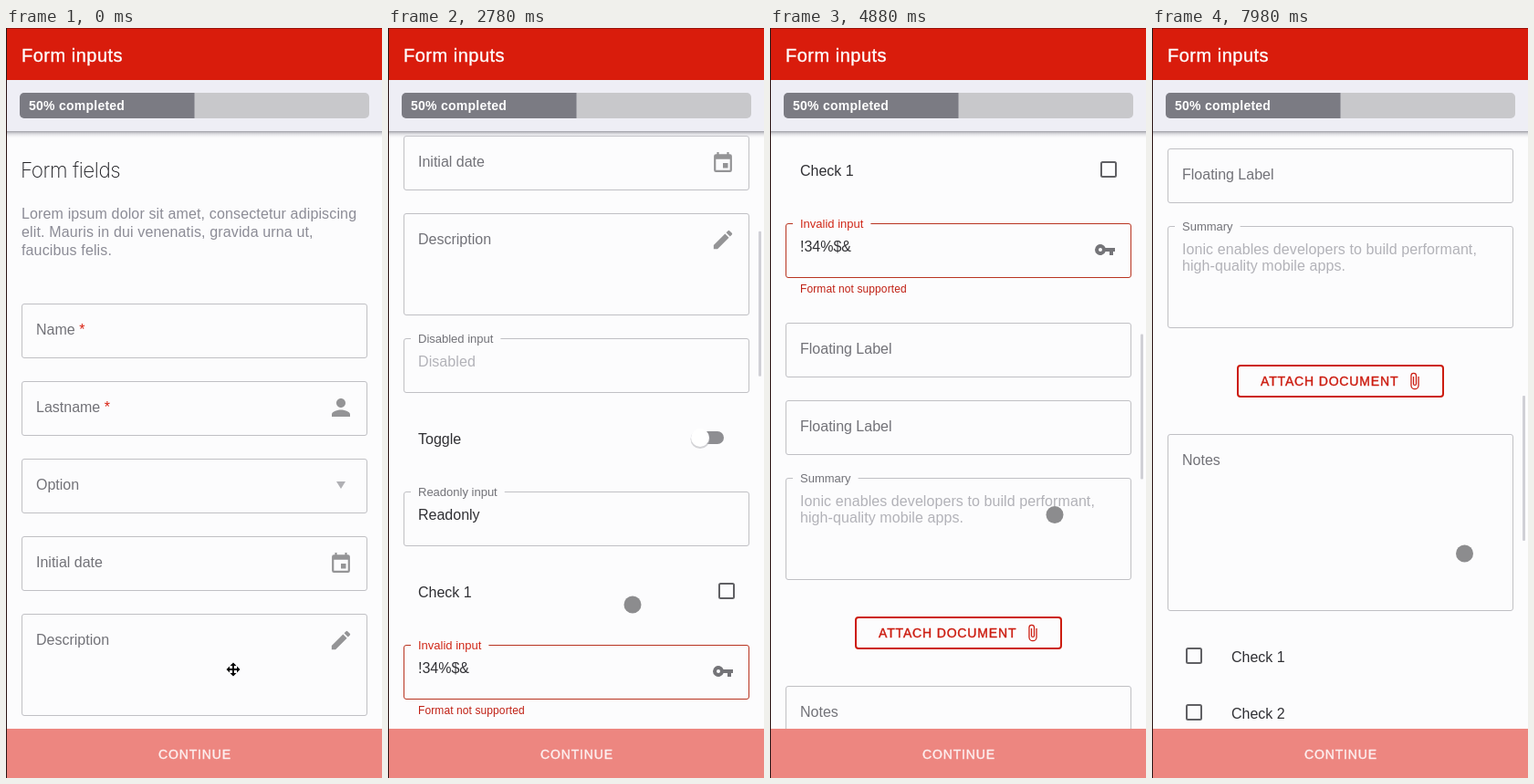
These frames come from a looping animation (412 by 822 pixels, 8000 ms). An HTML page:

```html
<!DOCTYPE html>
<html lang="en">
<head>
<meta charset="utf-8">
<title>Form inputs</title>
<style>
  html, body { margin: 0; width: 100%; height: 100%; overflow: hidden; background: #fcfcfd; }
  svg { display: block; width: 412px; height: 822px; font: 16px "Liberation Sans", Arial, sans-serif; }
  .heading { font: 200 22.5px Inter, sans-serif; letter-spacing: -.45px; fill: #1c1c20; }
  .intro { letter-spacing: .14px; fill: #8c8c96; }
  .label { fill: #727278; }
  .value { fill: #303034; }
  .faint { fill: #b2b2b8; letter-spacing: .08px; }
  .small { font-size: 13px; fill: #727278; }
  .small.bad { fill: #d02818; }
  .error { font-size: 12px; letter-spacing: .1px; fill: #c02014; }
  .title { font-size: 20px; letter-spacing: .5px; fill: #fff; stroke: #fff; stroke-width: .35px; }
  .percent { font-size: 14px; font-weight: bold; letter-spacing: .25px; fill: #fff; }
  .button { font-size: 14px; letter-spacing: .84px; stroke-width: .4px; }
  .red { fill: #cc1c10; stroke: #cc1c10; }
  .white { fill: #fdf0f0; stroke: #fdf0f0; }
</style>
</head>
<body>
<svg viewBox="0 0 412 822">
  <defs>
    <linearGradient id="shade" x2="0" y2="1">
      <stop stop-color="#808088" stop-opacity=".75"/>
      <stop offset=".4" stop-color="#c0c0c8" stop-opacity=".5"/>
      <stop offset="1" stop-color="#f0f0f4" stop-opacity="0"/>
    </linearGradient>
  </defs>
  <rect width="412" height="822" fill="#fcfcfd"/>
  <g id="page"></g>
  <rect id="thumb" x="406" width="3" height="159" rx="1" fill="#d0d0d6"/>

  <rect y="113" width="412" height="8" fill="url(#shade)"/>
  <rect y="57" width="412" height="56" fill="#eeeef5"/>
  <rect x="15" y="71" width="383" height="28" rx="5" fill="#c8c8cb"/>
  <path d="M206.500 71H20a5 5 0 0 0-5 5v18a5 5 0 0 0 5 5h186.500z" fill="#7b7b83"/>
  <text class="percent" x="25" y="90">50% completed</text>
  <rect width="412" height="57" fill="#d91c0c"/>
  <text class="title" x="17" y="37">Form inputs</text>

  <rect y="768" width="412" height="54" fill="#ed8680"/>
  <text class="button white" x="167" y="801">CONTINUE</text>
  <path d="M0 .5H412" stroke="#981008"/>
  <path d="M.5 0V822" stroke="#2a1414"/>

  <circle id="dot" r="9.500" fill="#8c8c8e"/>
  <path id="arrows" d="M0-7.500 3.500-4H1v3h3v-2.500L7.500 0 4 3.500V1H1v3h2.500L0 7.500-3.500 4H-1V1h-3v2.500L-7.500 0-4-3.500V-1h3v-3h-2.500z"
        fill="#000" stroke="#fff" stroke-width="1" paint-order="stroke"/>
</svg>
<script>
const DURATION = 8000;
const $ = id => document.getElementById(id);
const page = $('page');

function add(tag, attributes, content = '') {
  const node = document.createElementNS('http://www.w3.org/2000/svg', tag);
  for (const [key, value] of Object.entries(attributes)) node.setAttribute(key, value);
  node.textContent = content;
  return page.appendChild(node);
}

const text = (x, y, kind, content) => add('text', { x, y, class: kind }, content);

// Each icon: path on a 24-unit grid, grid centre, scale, colour.
const icons = {
  person: ['M12 12c2.21 0 4-1.79 4-4s-1.79-4-4-4-4 1.79-4 4 1.79 4 4 4zm0 2c-2.67 0-8 1.34-8 4v2h16v-2c0-2.66-5.33-4-8-4z', 12, 12, 1.25, '#949496'],
  event: ['M17 12h-5v5h5zM16 1v2H8V1H6v2H5a2 2 0 0 0-2 2v14a2 2 0 0 0 2 2h14a2 2 0 0 0 2-2V5a2 2 0 0 0-2-2h-1V1zm3 18H5V8h14z', 12, 11, 1.1, '#949496'],
  pencil: ['M3 17.25V21h3.75L17.81 9.94l-3.75-3.75zM20.71 7.04a1 1 0 0 0 0-1.41l-2.34-2.34a1 1 0 0 0-1.41 0l-1.83 1.83 3.75 3.75z', 12, 12, 1.13, '#949496'],
  key: ['M12.65 10A6 6 0 1 0 12.65 14H17v4h4v-4h2v-4zM7 14a2 2 0 1 1 0-4 2 2 0 0 1 0 4z', 12, 12, 1, '#747478'],
  arrow: ['M7 8H17L12 16z', 12, 12, 1, '#b0b0b4'],
  clip: ['M16.5 6v11.5a4 4 0 0 1-8 0V5a2.500 2.500 0 0 1 5 0v10.5a1 1 0 0 1-2 0V6H10v9.5a2.500 2.500 0 0 0 5 0V5a4 4 0 0 0-8 0v12.5a5.500 5.500 0 0 0 11 0V6z', 12.5, 12, .85, '#cc1c10'],
};

function icon(name, x, y) {
  const [d, cx, cy, scale, fill] = icons[name];
  add('path', { d, fill, 'fill-rule': 'evenodd', transform: `translate(${x} ${y}) scale(${scale}) translate(${-cx} ${-cy})` });
}

function outline(y, height, stroke = '#c0c0c4') {
  add('rect', { x: 17.5, y: y + .5, width: 378, height: height - 1, rx: 2.5, fill: 'none', stroke });
}

function field(y, label, iconName, height = 60) {
  outline(y, height);
  const node = text(33, y + 34, 'label', label);
  if (iconName) icon(iconName, 367, y + 29);
  return node;
}

// Field whose label sits in a gap of the top border.
function filledField(y, label, lines, kind, height = 60, bad = false) {
  outline(y, height, bad ? '#b83420' : undefined);
  const gap = add('rect', { x: 25, y: y - 1, height: 3, fill: '#fcfcfd' });
  const node = text(33, y + 4.5, bad ? 'small bad' : 'small', label);
  gap.setAttribute('width', node.getComputedTextLength() + 16);
  lines.forEach((line, i) => text(33, y + 31 + i * 18, kind, line));
}

function checkbox(x, y, textX, label) {
  add('rect', { x: x + 1, y: y - 8, width: 16, height: 16, rx: 1.5, fill: 'none', stroke: '#606064', 'stroke-width': 2 });
  text(textX, y + 7, 'value', label);
}

function required(label) {
  const star = add('tspan', { fill: '#d82010' }, ' *');
  label.appendChild(star);
}

text(16, 164, 'heading', 'Form fields');
['Lorem ipsum dolor sit amet, consectetur adipiscing', 'elit. Mauris in dui venenatis, gravida urna ut,', 'faucibus felis.']
  .forEach((line, i) => text(17, 209 + i * 20, 'intro', line));

required(field(302, 'Name'));
required(field(387, 'Lastname', 'person'));
field(472, 'Option', 'arrow');
field(557, 'Initial date', 'event');
field(642, 'Description', 'pencil', 112);
filledField(779, 'Disabled input', ['Disabled'], 'faint');

text(33, 895, 'value', 'Toggle');
add('rect', { x: 334, y: 881, width: 34, height: 14, rx: 7, fill: '#8e8e92' });
add('circle', { cx: 342, cy: 889.5, r: 10.5, fill: '#b8b8bc', opacity: .6 });
add('circle', { cx: 342, cy: 888, r: 10, fill: '#fff' });

filledField(947, 'Readonly input', ['Readonly'], 'value');
checkbox(362, 1056, 33, 'Check 1');
filledField(1115, 'Invalid input', ['!34%$&'], 'value', 60, true);
icon('key', 367, 1144);
text(33, 1191, 'error', 'Format not supported');
field(1224, 'Floating Label');
field(1309, 'Floating Label');
filledField(1394, 'Summary', ['Ionic enables developers to build performant,', 'high-quality mobile apps.'], 'faint', 112);

add('rect', { x: 94, y: 1547, width: 225, height: 34, rx: 3, fill: 'none', stroke: '#cc1c10', 'stroke-width': 2 });
text(119, 1569, 'button red', 'ATTACH DOCUMENT');
icon('clip', 288, 1564);

field(1622, 'Notes', null, 194);
checkbox(37, 1865, 87, 'Check 1');
checkbox(37, 1927, 87, 'Check 2');

// Drags and returns of the pointer: time, scroll, pointer x, pointer y.
const gestures = [
  [0, 0, 249, 703],
  [600, 0, 250, 703],
  [1500, 186, 257, 517],
  [1800, 186, 261.5, 581],
  [2050, 186, 263, 725],
  [2550, 439, 266, 472],
  [2780, 439, 268, 632],
  [3400, 532, 273, 539],
  [3520, 532, 274, 479.5],
  [3800, 532, 283, 720],
  [4250, 812, 295, 440],
  [4500, 812, 302, 622],
  [4880, 901, 312, 533.5],
  [5900, 901, 322, 608],
  [6980, 1019, 331.5, 490],
  [7350, 1019, 335, 734],
  [7980, 1177, 342.5, 576],
  [DURATION, 1177, 342.5, 576],
];

function pose(time) {
  const next = gestures.findIndex(gesture => gesture[0] > time);
  const from = gestures[next - 1], to = gestures[next];
  const u = (time - from[0]) / (to[0] - from[0]);
  const eased = u * u * (3 - 2 * u);
  return from.map((value, i) => value + (to[i] - value) * eased);
}

function draw(now) {
  const time = now % DURATION;
  const [, scroll, x, y] = pose(time);
  const touching = time >= 600;
  page.setAttribute('transform', `translate(0 ${-Math.round(scroll)})`);
  $('thumb').setAttribute('y', 115.5 + scroll * .2442);
  $('thumb').setAttribute('opacity', touching ? 1 : 0);
  for (const id of ['dot', 'arrows']) {
    $(id).setAttribute('transform', `translate(${x} ${y})`);
    $(id).setAttribute('opacity', (id === 'dot') === touching ? 1 : 0);
  }
}

const start = performance.now();
function tick() {
  draw(performance.now() - start);
  requestAnimationFrame(tick);
}
tick();
</script>
</body>
</html>
```
